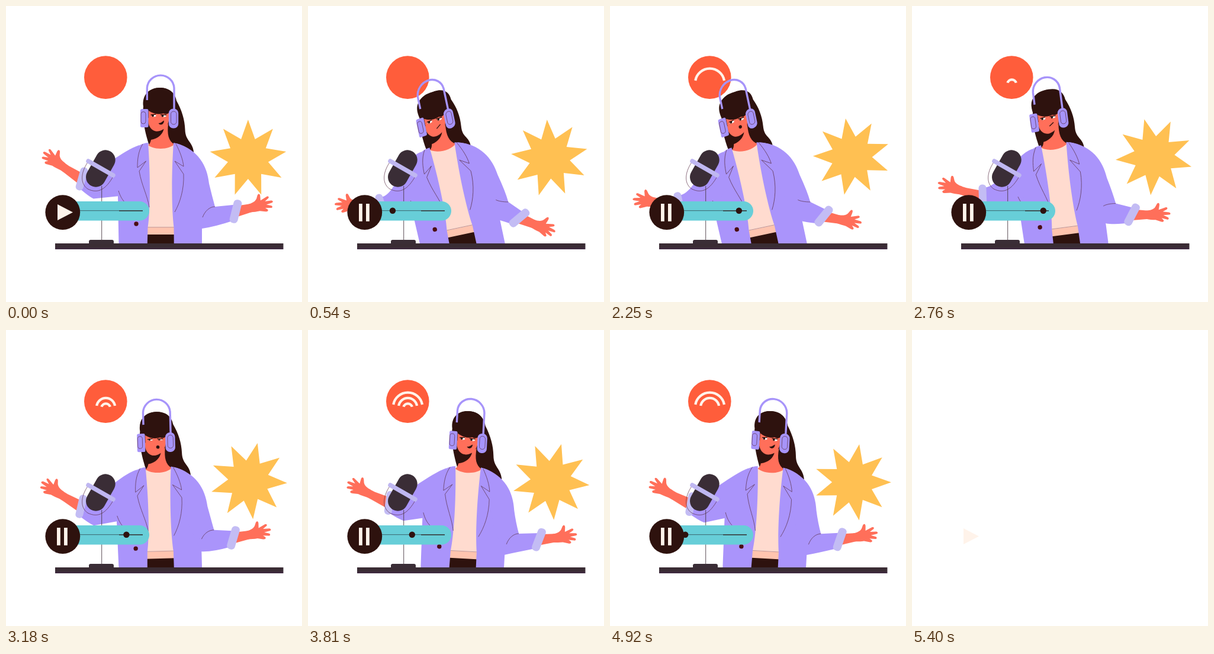
These frames come from a looping animation (500x500 px, 5.43 s). An HTML page:

```html
<!DOCTYPE html>
<html lang="en">
<head>
<meta charset="utf-8">
<title>Podcast host</title>
<style>
  html, body { margin: 0; width: 100%; height: 100%; overflow: hidden; background: #fff; }
  svg { display: block; width: 100vw; height: 100vh; }
  .skin { fill: #ff6f5a; }
  .dark { fill: #2e120e; }
  .jacket { fill: #aa94fb; }
  .cuff { fill: #c3bcf4; }
  .pale { fill: #fff3ea; }
  .mic { fill: #3a2d36; }
  .thin { fill: none; stroke: #5c3248; stroke-width: .7; stroke-linejoin: round; }
  .arc { fill: none; stroke: #fff3ea; stroke-width: 4.2; }
</style>
</head>
<body>
<svg viewBox="0 0 500 500">
  <defs>
    <clipPath id="aboveTable"><rect width="500" height="402"/></clipPath>
    <linearGradient id="wood" x2="0" y2="1">
      <stop offset=".6" stop-color="#3a2c34"/><stop offset="1" stop-color="#3f2942"/>
    </linearGradient>
    <!-- points right, the cuff is at the origin -->
    <path id="hand" class="skin" d="M24 -7 C31 -7.500 36 -9 39 -13 L42 -18.500 C45 -22 47 -19 46 -15 L45 -8.500
      L57 -12.800 C60.500 -13 60.500 -10 58 -9 L52 -5.500 L62.500 -4.500 C66 -3.500 65.500 -.5 62.500 -.4 L53 .5
      L61 4 C63.500 6 61.500 8.500 59 7.500 L50 5.500 L53.500 9 C54.500 12 51.500 12.500 49 11.500 L40 8.500 C34 8.500 30 8 24 7Z"/>
  </defs>

  <g id="scene">
    <circle cx="168.300" cy="120.600" r="36.300" fill="#ff5d3b"/>
    <path class="arc" d="M161.500 129.800 A7.400 7.400 0 0 1 175.800 129.800"/>
    <path class="arc" d="M153.200 128 A15.600 15.600 0 0 1 184 128"/>
    <path class="arc" d="M144.200 126 A24.800 24.800 0 0 1 193 126"/>

    <polygon id="star" fill="#ffc052"/>

    <g clip-path="url(#aboveTable)">
      <g class="headPart">
        <path id="hair" class="dark" d="M232 170 C229 150 243 138 260 138 C277 138 286 148 288 160 C297 176 302 192 302.500 209 C303 228 315 229 317 246 C314 264 288 262 270 242 L242 236 C239 226 232 205 231 180Z"/>
      </g>
      <g class="torso">
        <path class="skin" d="M245 226 C257 224 266 216 267 205 L274 199 C272 216 274 228 285 234 C282 246 244 246 238 236 C243 234 244 230 245 226Z"/>
        <path fill="#ffdbcf" d="M237 232 C246 244 276 244 286 232 L290 374 H234Z"/>
        <rect x="234" y="374" width="54" height="13" fill="#ffc4af"/>
        <path class="thin" style="opacity:.55" d="M237 373.700 H286"/>
        <rect class="dark" x="234" y="386" width="54" height="40"/>
        <path class="jacket" d="M240 231 C228 232 218 238 212 250 L189 322 L191 430 H238 L239.500 374 C244 345 244 285 240 231Z"/>
        <path class="jacket" d="M283 231 C297 234 310 240 318 250 L334 300 L331 376 V430 H284 L283.500 374 C280 345 279 290 283 231Z"/>
      </g>

      <g id="leftHand">
        <path class="skin" d="M0 -9 L30 -6.500 L42 -7 V7 L30 7.500 L0 10Z"/>
        <use href="#hand" x="14"/>
      </g>
      <g id="rightHand">
        <path class="skin" d="M0 -9 L28 -7 V7 L0 9.500Z"/>
        <use href="#hand"/>
      </g>
      <path id="leftSleeve" class="jacket"/>
      <path id="rightSleeve" class="jacket"/>
      <rect id="leftCuff" class="cuff" x="-6.500" y="-20" width="13" height="40" rx="6"/>
      <rect id="rightCuff" class="cuff" x="-7" y="-20" width="14" height="40" rx="6"/>
      <path id="crease" class="thin"/>

      <g class="torso">
        <path class="thin" d="M231 233 C223 246 222 260 222 273 L236.500 262 L225 279 C229 303 239 320 242 340"/>
        <path class="thin" d="M287 233 C294 246 299 260 300 271 L285 262 L300 284 C301 310 294 332 285 348"/>
        <path class="thin" d="M190 312 C193 322 197 328 202 333"/>
        <circle cx="220" cy="368" r="3.700" fill="#4b0d12"/>
      </g>

      <g class="headPart">
        <path class="skin" d="M239 174 L240.500 198 C243 208 250 212.500 257 211.500 C267 210 274 203 276 189 V174Z"/>
        <g id="eyes">
          <ellipse cx="249.500" cy="185.300" rx="4" ry="1.900" fill="#fff"/>
          <ellipse cx="266.500" cy="185.600" rx="4" ry="1.900" fill="#fff"/>
          <circle class="dark" cx="248" cy="185.300" r="1.900"/>
          <circle class="dark" cx="264.500" cy="185.600" r="1.900"/>
        </g>
        <path d="M244.500 184 L253 183 M261 183.600 L271 184" fill="none" stroke="#2e120e" stroke-width="1.300"/>
        <path class="dark mouth" d="M257.500 198 C262 198 264 195 267 193.500 C267 200 261 203 257.500 198Z"/>
        <path class="mouth" d="M258.500 199.500 L266 194.500" stroke="#2e120e" stroke-width="1.400"/>
        <circle class="dark mouth" cx="261.800" cy="197.500" r="2.800"/>
        <path class="dark" d="M241 190 C233 178 230 160 235 151 C240 142 250 138 260 138 C278 138 288 150 288.500 178 L278 178 C275 182 270 184 266 181.500 C258 184 248 182 241 177Z"/>
        <path d="M238.300 159 V138.500 A22.900 22.900 0 0 1 284 138.500 V177" fill="none" stroke="#a794fa" stroke-width="3.400"/>
        <rect x="227" y="174" width="13.500" height="31" rx="2.500" fill="#a794fa"/>
        <rect class="thin" x="228" y="178.500" width="8" height="20.500" rx="4"/>
        <rect x="274.800" y="173.500" width="16.400" height="33" rx="7.500" fill="#a794fa"/>
        <rect class="thin" x="278.500" y="178" width="9.500" height="22" rx="4.500"/>
      </g>
    </g>

    <rect x="83" y="401" width="385.500" height="10" fill="url(#wood)"/>
    <path class="mic" d="M140 402 V398 Q140 395 143 395 H179 Q182 395 182 398 V402Z"/>
    <path d="M161.700 304 V396" stroke="#4a3a44" stroke-width=".9"/>
    <path d="M168 260 L151.700 289" stroke="#3a2d36" stroke-width="33.400" stroke-linecap="round"/>
    <path class="thin" d="M138 264 C126 282 125 300 138 309 C156 318 169 309 181 288"/>
    <path d="M139 262 L181 286" stroke="#bfb7f1" stroke-width="7.500" stroke-linecap="round"/>
    <rect x="96" y="330" width="146" height="32.500" rx="16.200" fill="#67ced8"/>
    <path d="M120 345.700 H231" stroke="#2e4a52" stroke-width=".8"/>
    <path d="M191 346 H231" stroke="#2e120e" stroke-width="1"/>
    <circle id="knob" class="dark" cy="345.700" r="5.200"/>
    <circle class="dark" cx="95.800" cy="348.600" r="29.400"/>
    <path id="pause" class="pale" d="M86 334 h5.800 v29.800 h-5.800Z M98 334 h5.800 v29.800 h-5.800Z"/>
  </g>
  <path id="play" class="pale" d="M87 335 L113 348.500 L87 362Z"/>
</svg>

<script>
const LOOP = 5430, STEP = 30, END = 5400, RETURNED = 5100;

// time, torso angle, head tilt, left cuff x, y, arm angle, right cuff x, y, arm angle
const poses = [
  [0, 0, 0, 128, 292, 33, 388, 347, -13],
  [540, -12, -18.5, 124, 337, 0, 357, 358, 23],
  [1350, -10.6, -16.3, 97, 298, 24, 379, 341, -13.5],
  [1600, -10.8, -16.6, 95, 302, 21, 376, 344, -8],
  [2250, -12, -18.5, 117, 334, 4, 361, 355, 12],
  [2850, -6.5, -9, 120, 318, 18, 374, 352, -2],
  [3180, -1.5, -2, 127, 298, 30, 384, 351, -10.5],
  [3800, 3, 5.5, 137, 292, 25, 390, 354, -6],
  [4440, 7.2, 13.5, 155, 299, 14, 389, 369, 3],
  [5200, .3, .3, 128, 292, 33, 388, 347, -13],
  [END, 0, 0, 128, 292, 33, 388, 347, -13]
];
// mouth shapes: 0 smile, 1 closed line, 2 round
const mouthTimes = [[0, 0], [300, 1], [900, 0], [1800, 2], [2550, 1], [2900, 2], [3700, 0]];
// visible arcs as bits, inner to outer
const arcTimes = [[0, 0], [900, 1], [1200, 3], [1500, 7], [1800, 6], [2100, 4],
  [2400, 0], [2700, 1], [3000, 3], [3300, 7], [4800, 6], [5000, 4], [5200, 0]];

const $ = id => document.getElementById(id);
const all = sel => [...document.querySelectorAll(sel)];
const torsos = all('.torso'), heads = all('.headPart'), mouths = all('.mouth'), arcs = all('.arc');
const set = (el, name, value) => el.setAttribute(name, value);
const show = (el, on) => { el.style.display = on ? '' : 'none'; };
const valueAt = (list, t) => list.filter(k => k[0] <= t).pop()[1];

function turn(x, y, deg, cx = 0, cy = 0) {
  const a = deg * Math.PI / 180, c = Math.cos(a), s = Math.sin(a);
  return [cx + (x - cx) * c - (y - cy) * s, cy + (x - cx) * s + (y - cy) * c];
}

// slope at a key, flat at turning points
function slope(i, j) {
  const a = poses[i - 1], b = poses[i], c = poses[i + 1];
  if (!a || !c || (b[j] - a[j]) * (c[j] - b[j]) <= 0) return 0;
  return (c[j] - a[j]) / (c[0] - a[0]);
}

function poseAt(t) {
  let i = 0;
  while (i < poses.length - 2 && t >= poses[i + 1][0]) i++;
  const a = poses[i], b = poses[i + 1], d = b[0] - a[0], u = Math.min(1, (t - a[0]) / d);
  const e = u * u * (3 - 2 * u);
  return a.map((v, j) => v + (b[j] - v) * e
    + d * u * (1 - u) * ((1 - u) * slope(i, j) - u * slope(i + 1, j)));
}

function starPoints(deg) {
  const pts = [];
  for (let i = 0; i < 18; i++) {
    const p = turn(0, i % 2 ? -34.5 : -65.3, i * 20);
    pts.push(turn(p[0] + 408.9, p[1] + 257.4, deg, 408.9, 255.9).map(n => n.toFixed(2)));
  }
  return pts.join(' ');
}

function drawArms(lean, lx, ly, lDir, rx, ry, rDir) {
  const body = (x, y) => turn(x, y, lean, 262, 400);
  const off = (p, x, y) => [p[0] + x, p[1] + y];
  const lTilt = lDir - 17, rTilt = rDir + 27;

  set($('leftHand'), 'transform', `translate(${lx} ${ly}) rotate(${lDir}) scale(-1 1)`);
  set($('leftCuff'), 'transform', `translate(${lx} ${ly}) rotate(${lTilt})`);
  set($('rightHand'), 'transform', `translate(${rx} ${ry}) rotate(${rDir})`);
  set($('rightCuff'), 'transform', `translate(${rx} ${ry}) rotate(${rTilt})`);

  const s = body(225, 235), top = off(turn(0, -15, lTilt), lx, ly), low = off(turn(0, 16, lTilt), lx, ly);
  set($('leftSleeve'), 'd', `M${s} C${off(s, -32, 11)} ${off(top, 26, 5)} ${top} L${low}
    Q${off(low, ...turn(20, 3, lDir))} ${off(low, ...turn(30, 2, lDir))} L${body(192, 321)} L${body(215, 300)}Z`);

  const elbow = off(body(353, 339), 0, Math.max(0, -lean * .8));
  const rTop = off(turn(0, -12, rTilt), rx, ry), rLow = off(turn(0, 16, rTilt), rx, ry);
  set($('rightSleeve'), 'd', `M${body(288, 232)} C${body(325, 243)} ${body(340, 270)} ${body(343, 300)}
    Q${off(elbow, -5, -18)} ${elbow} L${rTop} L${rLow}
    Q${off(rLow, ...turn(-32, 3, rDir))} ${body(331, 376)} L${body(310, 330)}Z`);

  const dy = Math.min(18, 18 + lean * 1.8);
  set($('crease'), 'd', `M${off(elbow, -21, dy)} C${off(elbow, -17, dy * .4)} ${off(elbow, -9, 0)} ${elbow}`);
}

function draw(t) {
  const live = t < END, playing = t >= STEP && t < RETURNED;
  show($('scene'), live);
  show($('play'), !playing);
  if (!live) return;
  show($('pause'), playing);

  const [, lean, head, ...arms] = poseAt(t);
  const bodyTurn = `rotate(${lean} 262 400)`, tilt = head - lean;
  torsos.forEach(el => set(el, 'transform', bodyTurn));
  // the head follows the torso and tilts by a shear around its middle
  heads.forEach(el => set(el, 'transform',
    `${bodyTurn} translate(258.5 ${-tilt * .4}) skewY(${tilt}) translate(-258.5 0)`));
  set($('hair'), 'transform', `translate(0 190) skewX(${lean * .7}) translate(0 -190)`);
  drawArms(lean, ...arms);

  const half = RETURNED / 2, way = Math.max(0, 1 - Math.abs(t - half) / half);
  set($('knob'), 'cx', 119.3 + 111.7 * way);
  set($('star'), 'points', starPoints(t * .0671));

  const mouth = valueAt(mouthTimes, t), bits = valueAt(arcTimes, t);
  mouths.forEach((el, i) => show(el, i === mouth));
  arcs.forEach((el, i) => show(el, bits >> i & 1));
  const lids = [1350, 3180].some(k => Math.abs(t - k) < 90) ? .5 : 1;
  set($('eyes'), 'transform', `translate(0 ${185 * (1 - lids)}) scale(1 ${lids})`);
}

const start = performance.now();
function tick() {
  const t = (performance.now() - start) % LOOP;
  draw(Math.floor(t / STEP) * STEP);
  requestAnimationFrame(tick);
}
tick();
</script>
</body>
</html>
```
